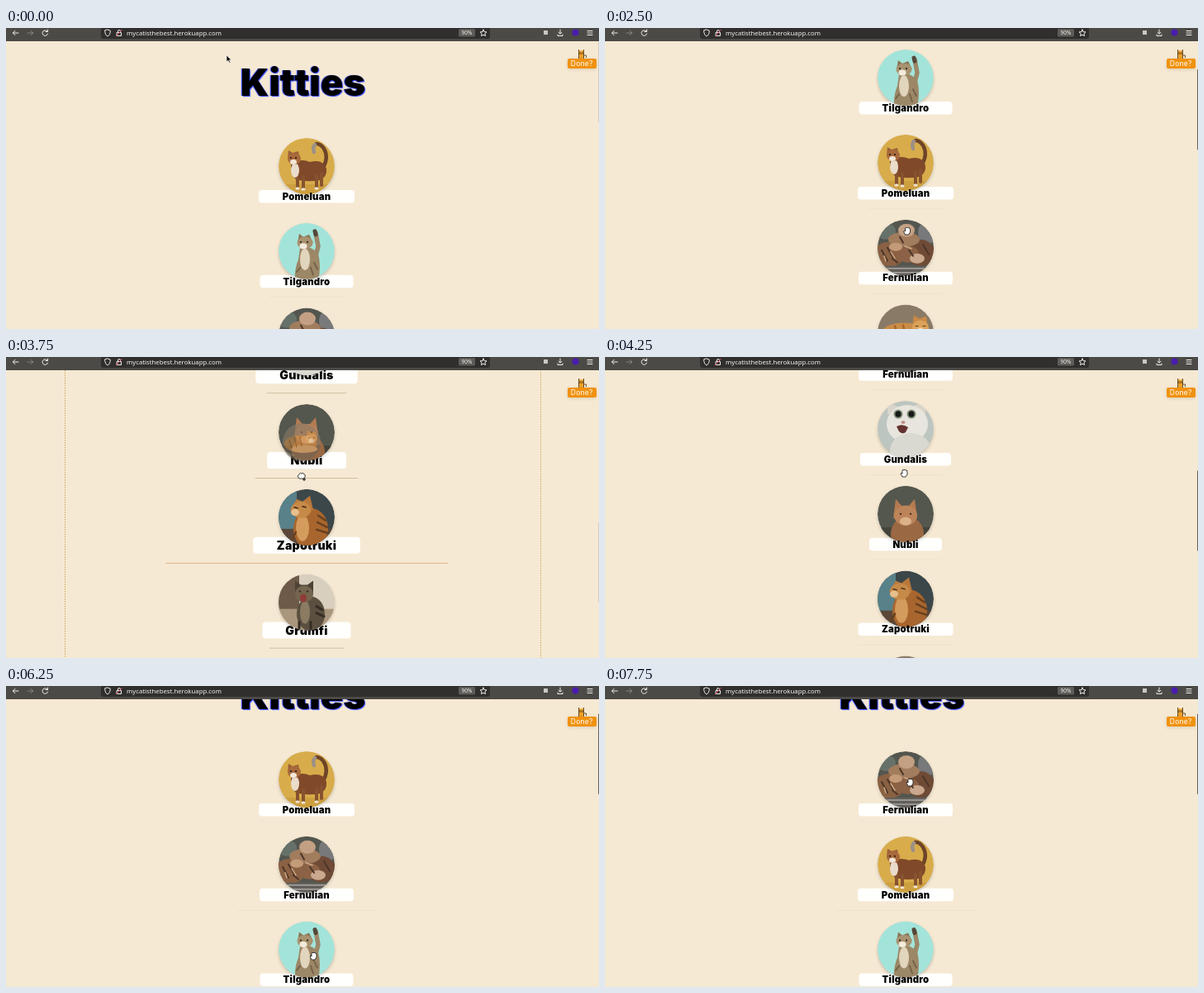
Animation, 718 px wide and 364 px high, one loop 8000 ms. Source, as an HTML page:

```html
<!DOCTYPE html>
<html lang="en">
<head>
<meta charset="utf-8">
<title>Kitties</title>
<style>
html, body { margin: 0; width: 100%; height: 100%; overflow: hidden; background: #f6e9d3; }
svg { display: block; width: 718px; height: 364px; }
text { font-family: Inter, sans-serif; }
.title { font-weight: 900; font-size: 45.5px; letter-spacing: 0; text-shadow: 1px 1px 1px #3048ff, -1px 0 1px #3048ff; }
.name { font-weight: 900; letter-spacing: .02em; }
.url, .zoom { font-family: "Noto Sans", sans-serif; fill: #f4f3f0; }
.url { font-size: 7.75px; }
.zoom { font-size: 6.5px; }
.done { font-weight: 400; font-size: 8.5px; letter-spacing: .03em; fill: #fff; }
.icon { fill: none; stroke: #eeedea; stroke-width: 1; stroke-linecap: round; stroke-linejoin: round; }
</style>
</head>
<body>
<svg viewBox="0 0 718 364">
  <defs>
    <clipPath id="disc"><circle r="34"/></clipPath>
    <filter id="soft" x="-30%" y="-30%" width="160%" height="160%"><feGaussianBlur stdDeviation="2"/></filter>
    <filter id="glow" x="-40%" y="-200%" width="180%" height="500%"><feGaussianBlur stdDeviation="9"/></filter>
    <g id="art"></g>
  </defs>
  <rect width="718" height="364" fill="#f6e9d3"/>
  <g id="page"></g>
  <g id="chrome">
    <rect width="718" height="16" fill="#4b4a47"/>
    <rect x="115" y="-6" width="471" height="19" rx="3" fill="#302f2d"/>
    <path class="icon" d="M15 6H8.500M11 3.300L8.300 6L11 8.700"/>
    <path class="icon" opacity=".35" d="M26 6H32.500M30 3.300L32.700 6L30 8.700"/>
    <path class="icon" d="M50 4A3.300 3.300 0 1 0 50.600 7M50.600 2V4.500H48"/>
    <path class="icon" d="M123 2L126.300 3.200C126.300 7 125 9 123 10C121 9 119.700 7 119.700 3.200Z"/>
    <path class="icon" d="M134.500 5.500H139.500V9.500H134.500ZM135.500 5.500V4A1.500 1.500 0 0 1 138.500 4V5.500"/>
    <path class="icon" style="stroke:#e0506a" d="M133.700 9.700L140.300 2.300"/>
    <text class="url" x="146" y="8.500">mycatisthebest.herokuapp.com</text>
    <rect x="548" y="1" width="20" height="9.500" rx="1.500" fill="#5d5c59"/>
    <text class="zoom" x="558" y="8" text-anchor="middle">90%</text>
    <path class="icon" d="M578 2L579.200 4.600L582 4.900L579.900 6.800L580.500 9.600L578 8.200L575.500 9.600L576.100 6.800L574 4.900L576.800 4.600Z"/>
    <rect x="651" y="3" width="5" height="5" fill="#c9c8c5"/>
    <path class="icon" d="M671 2V7M669 5.200L671 7.200L673 5.200M668 8V9.500H674V8"/>
    <circle cx="689.500" cy="5.500" r="4" fill="#4a1cae"/>
    <path class="icon" d="M704 3.500H710M704 6H710M704 8.500H710"/>
  </g>
  <g id="done">
    <path d="M693.500 38V26L695 27.500H698L699.500 26V38Z" fill="#eda02a"/>
    <path d="M693.500 26V38M699.500 26V38M693 31H700M699.500 33H702.500V36" stroke="#4a3413" stroke-width=".8" fill="none"/>
    <path d="M695 29V30M698 29V30" stroke="#222" stroke-width=".8"/>
    <rect x="680" y="38" width="35" height="12" rx="2" fill="#000" opacity=".12" filter="url(#soft)"/>
    <rect x="680" y="37" width="35" height="12" rx="2" fill="#f0920f"/>
    <text class="done" x="697.200" y="46" text-anchor="middle">Done?</text>
  </g>
  <g id="top"></g>
</svg>
<script>
const LOOP = 8000, STEP = 250, GAP = 102.8, FIRST = 167, CX = 364;
const el = id => document.getElementById(id);
const oval = (x, y, rx, ry, fill) => `<ellipse cx="${x}" cy="${y}" rx="${rx}" ry="${ry}" fill="${fill}"/>`;
const shape = (d, fill) => `<path d="${d}" fill="${fill}"/>`;
const stroke = (d, color, w) => `<path d="${d}" fill="none" stroke="${color}" stroke-width="${w}" stroke-linecap="round"/>`;
const box = (x, y, w, h, fill) => `<rect x="${x}" y="${y}" width="${w}" height="${h}" fill="${fill}"/>`;
const eyes = (x, y, gap) => oval(x, y, 1.2, 1, "#2b2118") + oval(x + gap, y, 1.2, 1, "#2b2118");

// name, width of its small label text, backdrop colour, picture
const cats = [
  { name: "Pomeluan", w: 59, bg: "#d8ac4a", art:
    box(-34, 22, 68, 12, "#cd9f3f") +
    stroke("M20 2Q27 -11 21 -21Q17 -27 12 -27", "#6d4428", 4.5) +
    stroke("M10 -26Q7 -23 9 -17", "#9c9087", 4.5) +
    shape("M-19 -2Q-8 -10 4 -5Q20 -9 24 3Q25 13 16 17Q0 20 -13 16Q-20 10 -19 -2Z", "#80492a") +
    stroke("M-11 12V26M-4 13V27M12 12V26M18 9V23", "#87522f", 4) +
    stroke("M-12 27H-10M-5 28H-3M11 27H13", "#f1e4d2", 3) +
    oval(-14, 5, 5, 9, "#eadccb") +
    shape("M-23 -9L-22 -19L-17 -16L-10 -18L-8 -8Z", "#9a6038") + oval(-15, -9, 8, 7, "#a96a3c") +
    oval(-16, -5, 4, 3, "#f3e7d8") + eyes(-19, -10, 6) },
  { name: "Tilgandro", w: 56, bg: "#a3e4da", art:
    stroke("M11 6L14 -6L11 -22", "#9c8869", 5.5) + stroke("M10 -24L11 -20", "#54483a", 5) +
    shape("M-8 -4Q4 -8 14 3Q18 18 14 36H-14Q-15 22 -10 10Z", "#9c8766") +
    oval(-2, 10, 6, 13, "#e2d5bd") +
    stroke("M-8 20L-12 25M9 14L13 22M5 20L8 29", "#75634a", 2) +
    shape("M-11 -10L-9 -21L-4 -17L3 -20L8 -10Z", "#897455") + oval(-2, -10, 9.5, 7.5, "#a8926f") +
    oval(-4, -6, 4.5, 3.5, "#f4ebdc") + eyes(-7, -11, 8) },
  { name: "Fernulian", w: 57, bg: "#53564f", art:
    oval(-24, -20, 12, 10, "#66716a") + oval(26, -18, 11, 14, "#77797a") +
    oval(-20, 8, 19, 15, "#8a6143") + oval(18, 6, 17, 16, "#6f4b36") +
    oval(-2, -10, 19, 9, "#a17c5d") + oval(1, -21, 10, 8, "#c3a083") +
    oval(3, 8, 13, 10, "#8c6246") + oval(14, 13, 9, 6, "#c9a88e") + oval(-12, -1, 8, 5, "#c49b78") +
    stroke("M-29 3L-22 16M-22 0L-15 12M-16 13L-10 18M21 -4L28 8M-7 -13L-3 -6M4 3L9 10", "#4c3528", 2) +
    stroke("M-26 10L-24 16M-18 5L-13 13M-1 -2L7 1", "#cfaa85", 1.500) +
    box(-34, 22, 68, 12, "#625f5b") + stroke("M-28 25H25M-24 30H20", "#a9a6a1", 1.500) },
  { name: "Lunitela", w: 49, bg: "#897a67", art:
    box(-34, 5, 68, 29, "#6f6254") + stroke("M-30 24L8 33M-33 16L-12 24", "#95866f", 1.5) +
    oval(-2, 3, 29, 15, "#ca8c46") + oval(4, 12, 24, 7, "#dfb276") +
    stroke("M-22 -3L-18 10M-13 -8L-9 8M-3 -9L0 6", "#a86629", 2.5) +
    shape("M8 -7L10 -21L17 -17L25 -20L27 -5Z", "#c98a45") + oval(18, -6, 10, 9, "#dba259") +
    oval(18, -2, 5, 4, "#f0d5aa") + stroke("M12 -8H15M21 -8H24", "#5b371b", 1) },
  { name: "Gundalis", w: 53, bg: "#bdc5c0", art:
    shape("M-22 -18L-22 -32L-7 -26L10 -28L24 -34L24 -10Z", "#dad5cb") +
    oval(2, -6, 25, 23, "#e7e5dd") + oval(6, 26, 25, 21, "#d9d9d2") +
    [-9, 7].map(x => oval(x, -18, 5.5, 5.5, "#829176") + oval(x, -18, 3.6, 3.8, "#171a18")).join("") +
    oval(-3, -8, 2.5, 1.700, "#bd8580") + shape("M-11 -3Q-4 -7 3 -2L0 4Q-4 7 -8 3Z", "#65332f") },
  { name: "Nubli", w: 31, bg: "#54574e", art:
    box(-34, 16, 68, 18, "#44443b") + oval(2, 24, 20, 21, "#9a6843") +
    shape("M-15 5L-12 -18L-5 -10L4 -10L11 -18L14 5Z", "#b47a50") + oval(0, 2, 14, 12, "#bd845a") +
    oval(0, 9, 7, 5, "#dbb18a") + eyes(-6, 0, 12) },
  { name: "Zapotruki", w: 58, bg: "#3c474a", art:
    box(-34, -34, 22, 50, "#58818a") + box(-34, 14, 68, 20, "#5c4738") +
    oval(5, 14, 21, 25, "#a8662e") + oval(-5, 13, 8, 16, "#d39b5c") +
    stroke("M14 -2L23 4M13 6L25 12M12 15L25 19M-13 18L-18 27", "#69401f", 2.5) +
    shape("M-20 -9L-12 -22L-5 -19L4 -26L8 -9L-3 1Z", "#b9783a") + oval(-7, -9, 12, 10, "#c68a48") +
    oval(-14, -6, 5, 4, "#e6bf8d") + stroke("M-15 -12L-11 -11M-5 -13L-1 -12", "#3a2515", 1.5) },
  { name: "Grumfi", w: 40, bg: "#d8cfbf", art:
    box(-34, -34, 25, 44, "#6d5a48") + box(-34, 8, 68, 26, "#aa967c") +
    oval(5, 14, 17, 21, "#5b5040") + oval(-2, 12, 6, 14, "#8b7b62") +
    stroke("M12 5L19 9M12 13L21 17M-9 24V32M5 24V32", "#352d24", 3) +
    shape("M-14 -11L-14 -26L-7 -21L1 -21L8 -26L8 -10Z", "#4d4335") + oval(-3, -10, 11, 10, "#74654f") +
    oval(-4, -5, 4, 5, "#8f3c38") + eyes(-8, -13, 9) }
];
el("art").innerHTML = cats.map((c, i) =>
  `<g id="cat${i}" clip-path="url(#disc)"><circle r="34" fill="${c.bg}"/>${c.art}</g>`).join("");

const orders = [
  [0, [0, 1, 2, 3, 4, 5, 6, 7]],
  [1950, [1, 0, 2, 3, 4, 5, 6, 7]],
  [3950, [1, 0, 2, 4, 5, 6, 3, 7]],
  [6050, [0, 2, 1, 4, 5, 6, 3, 7]],
  [7550, [2, 0, 1, 4, 5, 6, 3, 7]]
];
const drags = [
  { cat: 0, from: 1000, to: 1950, dx: 13, dy: 0 },
  { cat: 3, from: 3150, to: 3950, dx: 0, dy: -41 },
  { cat: 1, from: 5000, to: 6050, dx: -5, dy: -4 },
  { cat: 2, from: 6750, to: 7550, dx: -4, dy: -2 }
];
// [cat, enter, leave]
const targets = [[1, 1150, 1950], [4, 3250, 3400], [5, 3200, 3483], [6, 3592, 3950],
  [0, 5200, 5380], [2, 5400, 6050], [0, 7000, 7550]];
const hovers = [[0, 500, 1950], [3, 2700, 3950], [1, 4850, 6000], [2, 6450, 7450]];
const scrollKeys = [[0, 0], [2250, 0], [2900, 324], [3150, 324], [3700, 590], [4000, 590], [4600, 54]];
const mouseKeys = [[0, 267, 33], [250, 267, 33], [650, 352, 165], [1000, 352, 165], [1350, 366, 270],
  [1750, 369, 287], [2250, 369, 290], [2750, 362, 200], [3000, 360, 186], [3500, 359, 150],
  [3750, 358, 144], [4250, 362, 140], [4750, 378, 119], [5000, 378, 119], [5600, 374, 300],
  [6000, 372, 326], [6400, 372, 326], [6700, 370, 218], [6800, 370, 215], [7250, 369, 130], [7550, 369, 116]];

const clamp = v => Math.max(0, Math.min(1, v));
const ease = u => u * u * (3 - 2 * u);

function track(keys, t) {
  let i = 0;
  while (i < keys.length - 1 && keys[i + 1][0] <= t) i++;
  const a = keys[i], b = keys[i + 1] || a;
  const u = b === a ? 0 : ease((t - a[0]) / (b[0] - a[0]));
  return a.slice(1).map((v, k) => v + (b[k + 1] - v) * u);
}

// rises after `from`, falls after `to`
function level(t, from, to, time, power = 1) {
  const rest = s => Math.pow(1 - clamp((t - s) / time), power);
  return t < from ? 0 : t < to ? 1 - rest(from) : rest(to) * (1 - Math.pow(1 - clamp((to - from) / time), power));
}
const peak = (list, cat, t, time, power) => Math.max(0, ...list.filter(r => r[0] === cat)
  .map(r => level(t, r[1], r[2], time, power)));

function item(cat, slot, y, t, big) {
  const c = cats[cat], k = 1 + .25 * big, w = 57 + c.w * k, h = 15.5 + 4.5 * big;
  const top = y + 29 - 5 * big, mid = top + h / 2, size = 11.3 * k;
  const hover = peak(hovers, cat, t, 250), over = peak(targets, cat, t, 500, 3);
  const len = 90 + 370 * over;
  const glow = hover ? `<rect x="${CX - w / 2 - 5}" y="${top - 6}" width="${w + 10}" height="${h + 18}" rx="12"
    fill="#a07440" opacity="${.24 * hover}" filter="url(#glow)"/>` : "";
  const label = `<rect x="${CX - w / 2}" y="${top}" width="${w}" height="${h}" rx="4" fill="#fffffd"/>`;
  const name = `<text class="name" x="${CX}" y="${mid + size * .36}" font-size="${size}" text-anchor="middle">${c.name}</text>`;
  const photo = `<circle cx="${CX}" cy="${y + 2}" r="33.500" opacity=".22" filter="url(#soft)"/>
    <use href="#cat${cat}" x="${CX}" y="${y}"/>`;
  const rule = slot && hover < .5 ? `<path d="M${CX - len / 2} ${y + 55.5}h${len}" stroke="${over > .3 ? "#d69a68" : "#b9a283"}"
    opacity="${.11 + .5 * big + .15 * over * big}"/>` : "";
  const covered = big > 0 && t > 2500;
  return glow + label + (covered ? name + photo : photo + name) + rule;
}

const arrow = `<path d="M0 0V8L2 6.300L3.400 9.300L4.700 8.600L3.300 5.800H6Z" fill="#111" stroke="#fff" stroke-width=".6"/>`;
const hand = `<path d="M-2 5L-4 1Q-3 -1 -2 1V-3Q-1 -5 0 -3Q1 -5 2 -3Q4 -4 4 -1V2L2 5Z" fill="#fff" stroke="#111" stroke-width=".8"/>`;
const fist = `<path d="M-3 3L-5 0L-3 -2Q-2 -5 0 -3Q2 -5 3 -2Q5 -2 4 1L3 3Z" fill="#fff" stroke="#111" stroke-width=".8"/>
  <path d="M1 4H5M3 2V6" stroke="#111"/>`;

function draw(t) {
  const [scroll] = track(scrollKeys, t), [mx, my] = track(mouseKeys, t);
  const order = orders.filter(o => o[0] <= t).pop()[1];
  const drag = drags.find(d => t >= d.from && t < d.to);
  const big = Math.max(...drags.map(d => level(t, d.from, d.to, 150)));
  let out = `<text class="title" x="359.500" y="${82 - scroll}" text-anchor="middle">Kitties</text>`;
  if (big) out += `<rect x="71.500" y="${98 - scroll}" width="576" height="1000" rx="6" fill="none"
    stroke="#cba757" stroke-dasharray="1.500 1.500" opacity="${big}"/>`;
  order.forEach((cat, slot) => {
    const y = FIRST + GAP * slot - scroll;
    if (y > -70 && y < 410) out += item(cat, slot, y, t, big);
  });
  const dark = scroll > 0 && !drag;
  out += `<rect x="717" y="${17 + scroll * .31}" width="1" height="97" fill="${dark ? "#66615a" : "#d6cdbf"}"/>`;
  el("page").innerHTML = out;

  const ghost = drag ? `<use href="#cat${drag.cat}" opacity=".6" transform="translate(${mx + drag.dx} ${my + drag.dy}) scale(.68)"/>` : "";
  const pointer = drag ? fist : t < 500 ? arrow : hand;
  el("top").innerHTML = `${ghost}<g transform="translate(${mx} ${my})">${pointer}</g>`;
}

let last = -1;
const start = performance.now();
function tick() {
  const t = Math.floor((performance.now() - start) % LOOP / STEP) * STEP;
  if (t !== last) draw(last = t);
  requestAnimationFrame(tick);
}
tick();
</script>
</body>
</html>
```
